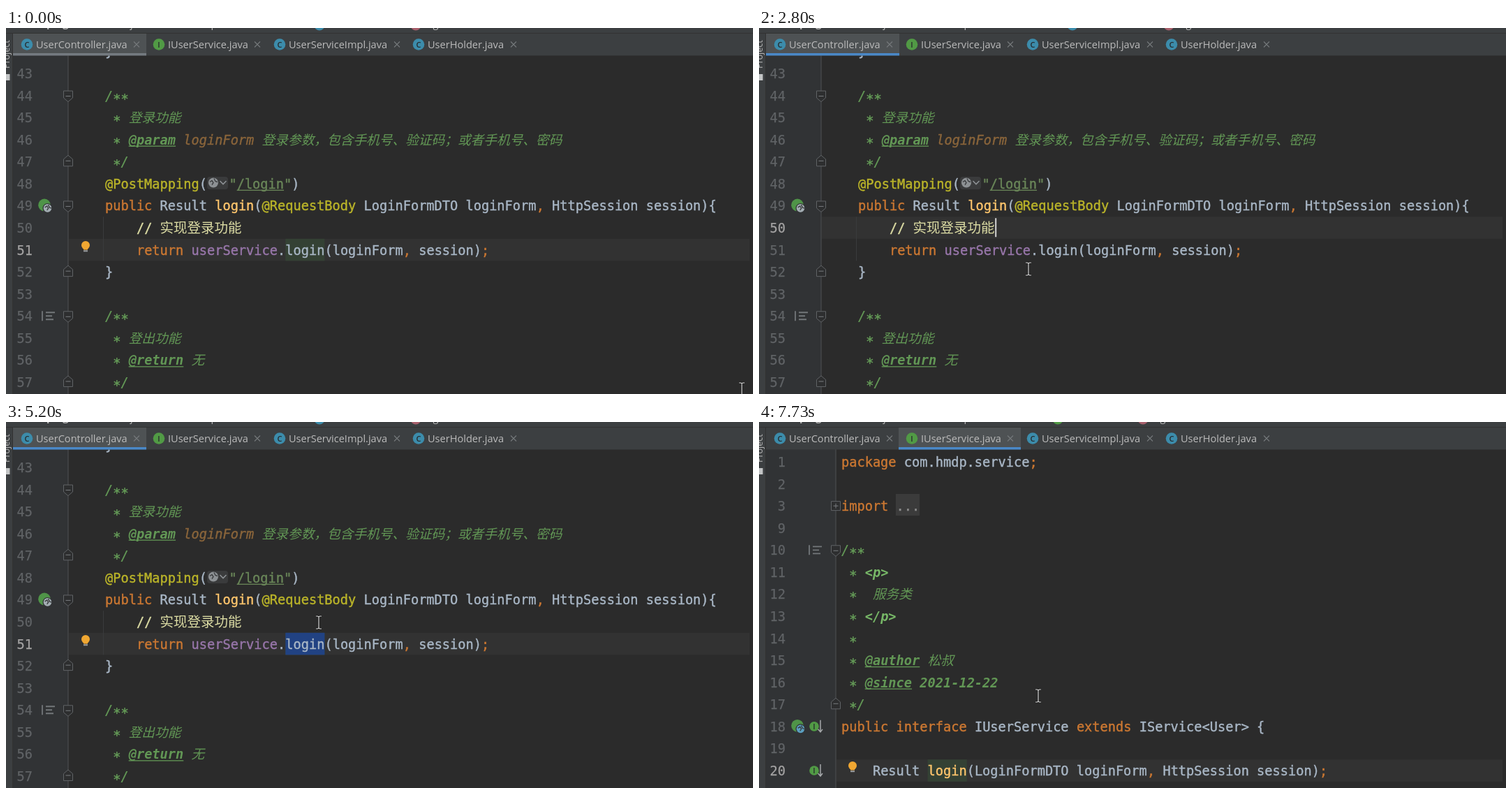
Recreate the animation shown at these times as an HTML page. Size 1070 by 524 pixels, loop 8 s.

```html
<!DOCTYPE html>
<html lang="zh">
<head>
<meta charset="utf-8">
<title>Editor</title>
<style>
html, body { margin: 0; width: 100%; height: 100%; overflow: hidden; background: #2b2b2b; }
svg { display: block; width: 1070px; height: 524px; }
text { white-space: pre; }
.code { font: 18.65px "DejaVu Sans Mono", monospace; fill: #a9b7c6; stroke: #a9b7c6; stroke-width: .4; }
.kw { fill: #cc7832; stroke: #cc7832; }
.ann { fill: #bbb529; stroke: #bbb529; }
.str { fill: #6a8759; stroke: #6a8759; }
.field { fill: #9876aa; stroke: #9876aa; }
.decl { fill: #ffc66d; stroke: #ffc66d; }
.note { fill: #dcdca4; stroke: #dcdca4; }
.doc { fill: #629755; stroke: #629755; font-style: italic; }
.tag { fill: #629755; stroke: none; font-style: italic; font-weight: bold; }
.html { fill: #77b767; stroke: none; font-style: italic; font-weight: bold; }
.val { fill: #8a653b; stroke: #8a653b; font-style: italic; }
.link { fill: #589df6; stroke: #589df6; }
.fold { fill: #8c8c8c; stroke: #8c8c8c; }
.zh { font: italic 300 18.7px "Noto Sans CJK SC", "Noto Sans CJK", sans-serif; fill: #629755; stroke: none; }
.zhNote { font: 500 19.5px "Noto Sans CJK SC", "Noto Sans CJK", sans-serif; fill: #dcdca4; stroke: none; }
.num { fill: #606366; stroke: #606366; stroke-width: .25; }
.num.on { fill: #a4a3a3; stroke: #a4a3a3; }
.ui { font: 14.57px "Open Sans", sans-serif; fill: #bbbbbb; }
.letter { font: 600 11px "Open Sans", sans-serif; fill: #26292b; text-anchor: middle; }
</style>
</head>
<body>
<svg id="stage" viewBox="0 0 1070 524"></svg>
<script>
const NS = "http://www.w3.org/2000/svg";
const CH = 11.23, PITCH = 31.57, LOOP = 8000, STEP = 200 / 3;
const stage = document.getElementById("stage");

function el(parent, tag, attrs, content) {
  const node = document.createElementNS(NS, tag);
  for (const k in attrs) node.setAttribute(k, attrs[k]);
  if (content) node.textContent = content;
  return parent.appendChild(node);
}
const set = (node, attrs) => { for (const k in attrs) node.setAttribute(k, attrs[k]); };
const show = (node, on) => node.setAttribute("visibility", on ? "visible" : "hidden");
const group = parent => el(parent, "g", {});
const rect = (p, x, y, width, height, fill, rx = 0) => el(p, "rect", { x, y, width, height, fill, rx });
const circle = (p, cx, cy, r, fill) => el(p, "circle", { cx, cy, r, fill });
const line = (p, d, stroke, width = 1.2) => el(p, "path", { d, stroke, "stroke-width": width, fill: "none" });
const label = (p, x, y, cls, str) => el(p, "text", { x, y, class: cls }, str);

// One code row: parts are [column, text, class]; "_" after a class underlines it.
function codeRow(parent, x0, y, parts) {
  return parts.map(([col, str, cls = ""]) => {
    const x = x0 + col * CH, under = cls.endsWith("_");
    const name = cls.replace("_", "");
    const stars = /^\*+$/.test(str);
    const node = label(parent, x, y + (stars ? 4 : 0), name.startsWith("zh") ? name : "code " + name, str);
    if (under) rect(parent, x, y + 1.8, str.length * CH, 1.3, name === "str" ? "#6a8759" : "#629755");
    return node;
  });
}

function foldMark(p, x, y, kind) {
  const shapes = {
    start: "M-6.5-7.5H6.5V2.5L0 8L-6.5 2.5Z",
    end: "M-6.5 7.5H6.5V-2.5L0-8L-6.5-2.5Z",
    plus: "M-6.5-6.5H6.5V6.5H-6.5Z"
  };
  const g = el(p, "g", { transform: `translate(${x} ${y})` });
  el(g, "path", { d: shapes[kind], fill: "#2d2e2f", stroke: "#606366" });
  line(g, "M-3.5 0H3.5" + (kind === "plus" ? "M0-3.5V3.5" : ""), "#7a7d80", 1);
}

function globe(p, x, y, r, color) {
  circle(p, x, y, r, color);
  line(p, `M${x - r + 2} ${y - 1}l3-2l2 3l-2 3M${x + 1} ${y - r + 1}l2 4l3 1`, "#3b3d3f", 1.4);
}

function paragraphMark(p, x, y) {
  line(p, `M${x} ${y - 7}V${y + 7}M${x + 5} ${y - 5}H${x + 18}M${x + 5} ${y}H${x + 14}M${x + 5} ${y + 5}H${x + 16}`, "#73777a", 1.8);
}

function badge(p, x, y, letter, r = 8.3) {
  circle(p, x, y, r, letter === "C" ? "#3c8cab" : "#519a45");
  label(p, x, y + 4, "letter", letter);
}

function implemented(p, x, y) {
  badge(p, x, y, "I", 6.8);
  line(p, `M${x + 9} ${y - 9}V${y + 8}M${x + 5.5} ${y + 4}L${x + 9} ${y + 8}L${x + 12} ${y + 4}`, "#a5a8aa", 1.5);
}

function beanMark(p, y, inner) {
  circle(p, 55, y - 1, 8.8, "#4f9448");
  circle(p, 59.5, y + 3.5, 7, "#313335");
  globe(p, 59.5, y + 3.5, 5.8, inner);
}

function pane(gutter) {
  const root = group(stage);
  rect(root, 10, 39, 1060, 485, "#2b2b2b");
  rect(root, 10, 39, gutter - 10, 485, "#313335");
  const row = rect(root, gutter + 1, 0, 1064 - gutter, PITCH, "#323232");
  line(root, `M${gutter} 39V524`, "#505254", 1);
  const under = group(root), text = group(root);
  return { root, row, under, text };
}

function lineNumber(p, n, y) {
  return el(p, "text", { x: 38, y, class: "code num", "text-anchor": "end" }, String(n));
}

// Controller file
const A = pane(89), AX = 142;
const midA = n => 65 + (n - 43) * PITCH;
const topA = n => midA(n) - PITCH / 2;
const baseA = n => midA(n) + 7;
const rowsA = {
  42: [[0, "}"]],
  44: [[0, "/", "tag"], [1, "**", "tag"]],
  45: [[1, "*", "tag"], [3, "登录功能", "zh"]],
  46: [[1, "*", "tag"], [3, "@param", "tag_"], [10, "loginForm", "val"], [20, "登录参数，包含手机号、验证码；或者手机号、密码", "zh"]],
  47: [[1, "*", "tag"], [2, "/", "tag"]],
  48: [[0, "@PostMapping", "ann"], [12, "("], [15.8, '"', "str"], [16.8, "/login", "str_"], [22.8, '"', "str"], [23.8, ")"]],
  49: [[0, "public", "kw"], [7, "Result"], [14, "login", "decl"], [19, "("], [20, "@RequestBody", "ann"],
    [33, "LoginFormDTO loginForm"], [55, ",", "kw"], [57, "HttpSession session){"]],
  50: [[4, "//", "note"], [7, "实现登录功能", "zhNote"]],
  51: [[4, "return", "kw"], [11, "userService", "field"], [22, "."], [23, "login"], [28, "(loginForm"],
    [38, ",", "kw"], [40, "session)"], [48, ";", "kw"]],
  52: [[0, "}"]],
  54: [[0, "/", "tag"], [1, "**", "tag"]],
  55: [[1, "*", "tag"], [3, "登出功能", "zh"]],
  56: [[1, "*", "tag"], [3, "@return", "tag_"], [11, "无", "zh"]],
  57: [[1, "*", "tag"], [2, "/", "tag"]]
};
const numsA = {};
for (let n = 43; n <= 57; n++) numsA[n] = lineNumber(A.text, n, baseA(n));
let callText;
for (const n in rowsA) {
  const nodes = codeRow(A.text, AX, baseA(+n), rowsA[n]);
  if (+n === 51) callText = nodes[3];
}
for (const n of [44, 49, 54]) foldMark(A.text, 89, midA(n) + 1, "start");
for (const n of [47, 52, 57]) foldMark(A.text, 89, midA(n) - 1, "end");
beanMark(A.text, midA(49), "#a3adb3");
paragraphMark(A.text, 52, midA(54));
rect(A.text, 288, 213, 30, 18, "#3a3b3c", 4);
globe(A.text, 297, 221.5, 7, "#8d9194");
line(A.text, "M306.5 219L311 223.5L315.5 219", "#8d9194", 1.6);
line(A.under, `M139.5 ${topA(50)}V${topA(52)}`, "#393b3c", 1);
const mark = rect(A.under, 0, 0, 5 * CH, PITCH, "#344134");
const selection = rect(A.under, 0, 0, 0, PITCH, "#214283");

// Interface file
const B = pane(110), BX = 118;
const midB = i => 57 + i * PITCH;
const rowsB = [
  [1, [[0, "package", "kw"], [8, "com.hmdp.service"], [24, ";", "kw"]]],
  [2, []],
  [3, [[0, "import", "kw"], [7, "...", "fold"]]],
  [9, []],
  [10, [[0, "/", "tag"], [1, "**", "tag"]]],
  [11, [[1, "*", "tag"], [3, "<p>", "html"]]],
  [12, [[1, "*", "tag"], [4, "服务类", "zh"]]],
  [13, [[1, "*", "tag"], [3, "</p>", "html"]]],
  [14, [[1, "*", "tag"]]],
  [15, [[1, "*", "tag"], [3, "@author", "tag_"], [11, "松叔", "zh"]]],
  [16, [[1, "*", "tag"], [3, "@since", "tag_"], [10, "2021-12-22", "tag"]]],
  [17, [[1, "*", "tag"], [2, "/", "tag"]]],
  [18, [[0, "public", "kw"], [7, "interface", "kw"], [17, "IUserService"], [30, "extends", "kw"], [38, "IService<User> {"]]],
  [19, []],
  [20, [[4, "Result"], [11, "login", "decl"], [16, "(LoginFormDTO loginForm"], [39, ",", "kw"], [41, "HttpSession session)"], [61, ";", "kw"]]]
];
rect(B.under, 196, 103, 34, 31, "#3b3b3b");
rect(B.under, BX + 11 * CH, midB(14) - PITCH / 2, 5 * CH, PITCH, "#344134");
set(B.row, { y: midB(14) - PITCH / 2 });
rowsB.forEach(([n, parts], i) => {
  const num = lineNumber(B.text, n, midB(i) + 7);
  if (n === 20) num.classList.add("on");
  codeRow(B.text, BX, midB(i) + 7, parts);
});
foldMark(B.text, 110, midB(2), "plus");
foldMark(B.text, 110, midB(4) + 1, "start");
foldMark(B.text, 110, midB(11) - 1, "end");
paragraphMark(B.text, 72, midB(4));
beanMark(B.text, midB(12), "#5b9fc0");
implemented(B.text, 79, midB(12));
implemented(B.text, 79, midB(14));

// Window frame: breadcrumbs, tabs and side strip
const frame = group(stage);
rect(frame, 0, 0, 1070, 39.5, "#3c3f41");
rect(frame, 0, 39, 9, 485, "#3c3f41");
rect(frame, 9, 8, 1, 516, "#323232");
rect(frame, 0, 7, 1070, 1, "#323232");
const crumbs = group(frame);
el(crumbs, "text", { x: 58, y: -1, class: "ui", "font-weight": 700, style: "font-weight:700" }, "ping");
[[104, "src"], [134, "main"], [178, "java"], [218, "com"], [262, "hmdp"]].forEach(([x, s]) => label(crumbs, x, -1, "ui", s));
function crumbTail(x, folder, letter, name, method) {
  const g = group(crumbs);
  label(g, 317, -1, "ui", folder);
  circle(g, x, -4, 7.5, letter === "C" ? "#3c8cab" : "#519a45");
  label(g, x + 12, -1, "ui", name);
  circle(g, method, -4, 7.5, "#a8606c");
  label(g, method + 12, -1, "ui", "login");
  return g;
}
const crumbA = crumbTail(449, "controller", "C", "UserController", 587);
const crumbB = crumbTail(428, "service", "I", "IUserService", 550);

const tabFill = rect(frame, 10, 8, 191, 28.5, "#4e5254");
const tabLine = rect(frame, 10, 36, 191, 3.5, "#747a80");
[["C", 30, "UserController", 187], ["I", 219, "IUserService", 360],
  ["C", 392, "UserServiceImpl", 560], ["C", 591, "UserHolder", 727]].forEach(([letter, x, name, close]) => {
  badge(frame, x, 23.5, letter);
  label(frame, x + 13, 29, "ui", name + ".java");
  line(frame, `M${close - 4} 19.5l8 8m0-8l-8 8`, "#75797b", 1.1);
});
const side = label(frame, 0, 0, "ui", "Project");
set(side, { transform: "translate(5 58) rotate(-90)", style: "font-size:12.6px" });
rect(frame, 0, 66, 5.5, 9, "#c3c5c6");

// Moving parts
const bulb = group(stage);
circle(bulb, 0, 0, 6, "#f0a732");
rect(bulb, -3, 4, 6, 2.5, "#f0a732");
rect(bulb, -3, 7.2, 6, 2, "#9a9da0");
const caret = rect(stage, 0, 0, 2, 27, "#d4d4d4");
const mouse = group(stage);
const beam = "M-4-9H-1.5L0-8L1.5-9H4M0-8V8M-4 9H-1.5L0 8L1.5 9H4";
line(mouse, beam, "#1c1c1c", 2.8);
line(mouse, beam, "#d8d8d8", 1.2);

// Pointer stops: time, x, y
const path = [
  [0, 1054, 517], [667, 302, 258], [1067, 302, 258], [1400, 347, 257], [1600, 352, 258],
  [1867, 352, 258], [2067, 352, 299], [2533, 352, 299], [2800, 386, 345], [3000, 405, 352],
  [3400, 402, 322], [3533, 402, 322], [4133, 460, 325], [4400, 460, 325], [4733, 444, 332],
  [4867, 444, 332], [5200, 448, 287], [5400, 447, 287], [5533, 447, 308], [5600, 447, 308],
  [5800, 343, 283], [6000, 440, 322], [7333, 440, 322], [7733, 400, 392], [8000, 400, 392]
];
function pointer(t) {
  let i = 1;
  while (i < path.length - 1 && path[i][0] < t) i++;
  const [t0, x0, y0] = path[i - 1], [t1, x1, y1] = path[i];
  const u = Math.min(1, Math.max(0, (t - t0) / (t1 - t0)));
  const k = u * u * (3 - 2 * u);
  return [x0 + (x1 - x0) * k, y0 + (y1 - y0) * k];
}

function draw(time) {
  const t = Math.floor(time / STEP + 0.06) * STEP;
  const within = (a, b) => t >= a - 5 && t < b - 5;
  const [mx, my] = pointer(t);
  set(mouse, { transform: `translate(${mx} ${my})` });

  const second = within(6730, 9000);
  show(A.root, !second);
  show(B.root, second);
  show(crumbA, !within(7000, 9000));
  show(crumbB, within(7000, 9000));
  const tab = second ? { x: 200, width: 175 } : { x: 10, width: 191 };
  set(tabFill, tab);
  set(tabLine, { ...tab, fill: within(0, 1070) ? "#747a80" : "#4a88c7" });

  const cur = within(1070, 2270) ? 49 : within(2270, 3530) ? 50 : 51;
  set(A.row, { y: topA(cur) });
  for (const n in numsA) numsA[n].classList.toggle("on", +n === cur);

  const picking = within(1070, 2270) || within(3530, 6200);
  const startX = AX + (cur === 49 ? 14 : 23) * CH;
  const endX = within(4130, 6200) ? 460 : within(1600, 2270) ? 352 : mx;
  const count = Math.max(0, Math.min(5, Math.round((endX - startX) / CH)));
  set(selection, { x: startX, y: topA(cur), width: picking ? count * CH : 0 });
  set(mark, { x: startX, y: topA(cur), width: cur === 50 ? 0 : 5 * CH });
  callText.setAttribute("class", within(6400, 6730) ? "code link" : "code");

  const caretX = picking ? startX + count * CH : cur === 50 ? 339 : startX + 3 * CH;
  set(caret, { x: caretX - 0.8, y: topA(cur) + 2 });
  show(caret, within(1070, 4870) || within(6200, 6730));

  show(bulb, within(0, 1070) || within(3270, 3530) || within(4870, 6200) || within(7600, 9000));
  const bulbAt = second ? [134, midB(14) - 7] : [114, midA(cur) - 6.5];
  set(bulb, { transform: `translate(${bulbAt})` });
}

const begin = performance.now();
function tick() {
  draw((performance.now() - begin) % LOOP);
  requestAnimationFrame(tick);
}
draw(0);
requestAnimationFrame(tick);
</script>
</body>
</html>
```
